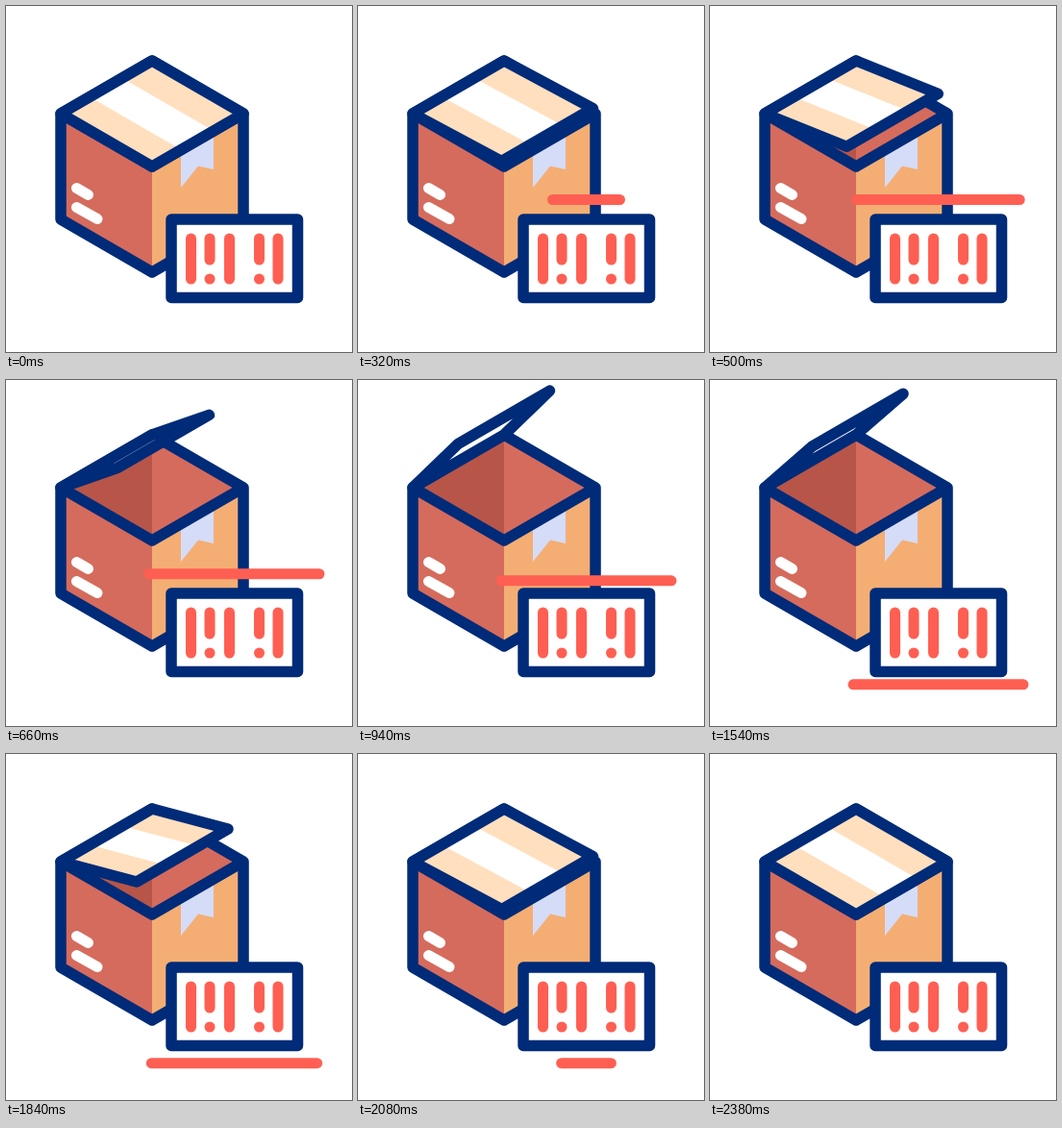
An HTML page for the animation above (2400 ms loop, 360x360 px).

```html
<!DOCTYPE html>
<html lang="en">
<head>
<meta charset="utf-8">
<title>Parcel scan</title>
<style>
  html, body { margin: 0; width: 100%; height: 100%; overflow: hidden; background: #fff; }
  svg { display: block; width: 100vw; height: 100vh; }
  .line { fill: none; stroke: #002b78; stroke-width: 11.5; stroke-linecap: round; stroke-linejoin: round; }
  .mark { fill: none; stroke-width: 11; stroke-linecap: round; }
  .white { stroke: #fff; }
  .red { stroke: #ff5f52; }
</style>
</head>
<body>
<svg viewBox="0 0 360 360">
  <!-- Box -->
  <path fill="#d56b5d" d="M57 112L152 167V277L57 222Z"/>
  <path fill="#f4ae74" d="M152 167L247 112V222L152 277Z"/>
  <path fill="#b75549" d="M152 57V167L57 112Z"/>
  <path fill="#d56b5d" d="M152 57L247 112L152 167Z"/>
  <path fill="#d5dcf8" d="M182 150L216 130V170L200 166.500L182 189Z"/>
  <path class="mark white" d="M73.500 189.500L85.500 196.500M73.500 209.500L95 221.500"/>
  <path class="line" d="M57 112L152 57L247 112V222L152 277L57 222ZL152 167L247 112"/>

  <!-- Lid -->
  <path id="lid"/>
  <path id="tape" fill="#fff"/>
  <path id="rim" class="line"/>

  <!-- Label -->
  <rect class="line" x="172" y="222" width="131.500" height="81.500" style="fill:#fff"/>
  <path class="mark red" d="M192.500 242V284M212 242V264M212 284h.01M232.500 242V284M263.500 242V264M263.500 284h.01M283 242V284"/>

  <path id="beam" class="mark red"/>
</svg>
<script>
const LOOP = 2400;
const [lid, tape, rim, beam] = ['lid', 'tape', 'rim', 'beam'].map(id => document.getElementById(id));

// cubic-bezier(.833, 0, .167, 1), solved by bisection
function ease(u) {
  if (u <= 0) return 0;
  if (u >= 1) return 1;
  let lo = 0, hi = 1;
  for (let i = 0; i < 24; i++) {
    const s = (lo + hi) / 2, r = 1 - s;
    const x = 3 * r * r * s * .833 + 3 * r * s * s * .167 + s ** 3;
    if (x < u) lo = s; else hi = s;
  }
  return lo * lo * (3 - 2 * lo);
}
const span = (t, from, to) => ease((t - from) / (to - from));

// Part of the lid between two fractions of its hinge edge
function strip(a, b, dx, dy) {
  const hinge = f => [57 + 95 * f, 112 - 55 * f];
  const [ax, ay] = hinge(a), [bx, by] = hinge(b);
  return `M${ax} ${ay}L${bx} ${by}l${dx} ${dy}L${ax + dx} ${ay + dy}Z`;
}

function draw(t) {
  const open = span(t, 0, 1200) - span(t, 1200, 2400);
  const dx = 95 - 49 * open, dy = 55 - 104 * open;
  const outside = 95 * dy + 55 * dx > 0;
  const whole = strip(0, 1, dx, dy);
  lid.setAttribute('d', whole);
  lid.setAttribute('fill', outside ? '#ffdfbd' : '#fff');
  tape.setAttribute('d', strip(.316, .674, dx, dy));
  rim.setAttribute('d', whole);

  const half = 88.5 * (span(t, 0, 667) - span(t, 1700, LOOP));
  const y = 201.5 + 120.2 * span(t, 580, 1850);
  beam.setAttribute('d', half > .3 ? `M${237.5 - half} ${y}H${237.5 + half}` : '');
}

function tick() {
  draw(performance.now() % LOOP);
  requestAnimationFrame(tick);
}
tick();
</script>
</body>
</html>
```
